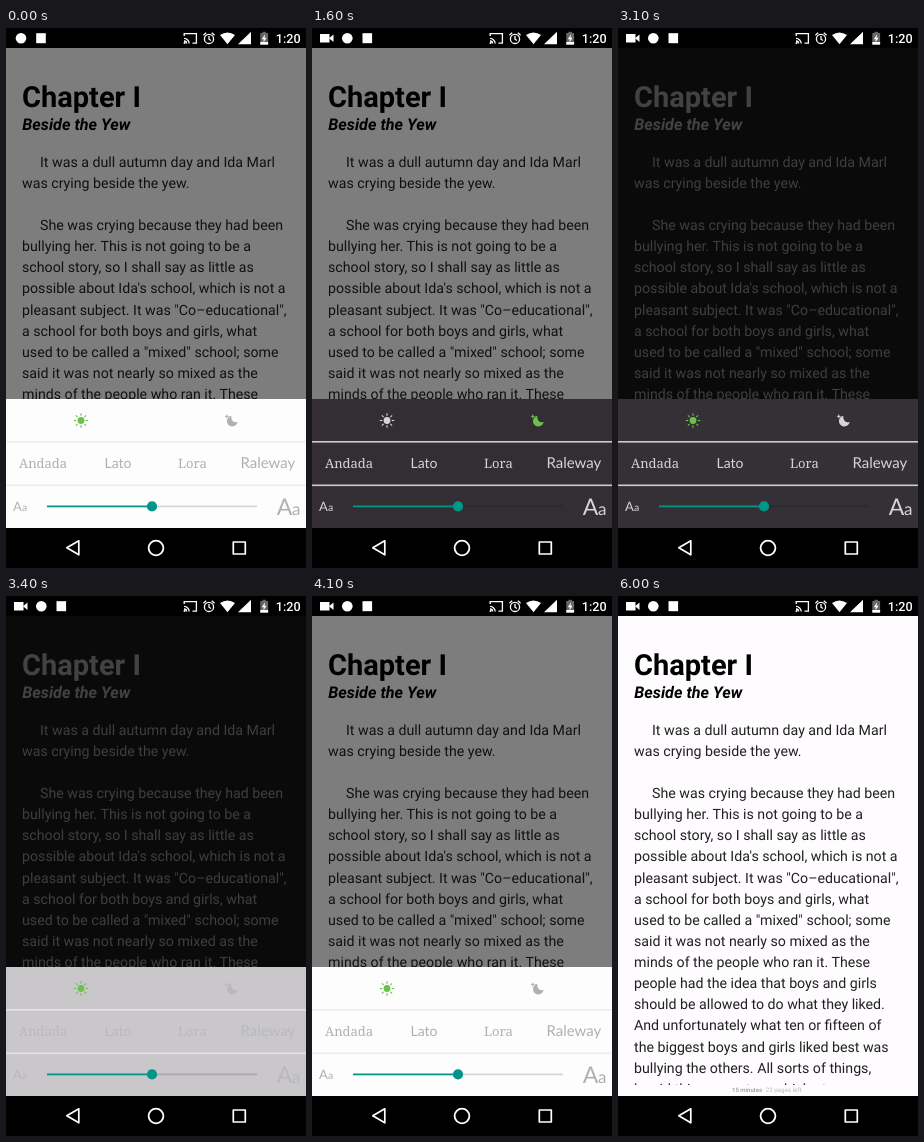
Animation of 300x540 px, one loop 7.1 s. Source, as an HTML page with a canvas:

```html
<!DOCTYPE html>
<html lang="en">
<head>
<meta charset="utf-8">
<title>Reader settings</title>
<style>
html, body { margin: 0; width: 100%; height: 100%; overflow: hidden; background: #000; }
canvas { display: block; width: 300px; height: 540px; }
</style>
</head>
<body>
<canvas id="stage"></canvas>
<script>
const W = 300, H = 540, LOOP = 7100, STEP = 100;
const TEAL = '#009688', GREEN = '#6cc04c';
const SHEET_TOP = 371, SHEET_H = 129;

const canvas = document.getElementById('stage');
const ctx = canvas.getContext('2d');
const dpr = window.devicePixelRatio || 1;
canvas.width = W * dpr;
canvas.height = H * dpr;

const LINES = [
  '>It was a dull autumn day and Ida Marl',
  'was crying beside the yew.',
  '',
  '>She was crying because they had been',
  'bullying her. This is not going to be a',
  'school story, so I shall say as little as',
  'possible about Ida\'s school, which is not a',
  'pleasant subject. It was "Co\u2013educational",',
  'a school for both boys and girls, what',
  'used to be called a "mixed" school; some',
  'said it was not nearly so mixed as the',
  'minds of the people who ran it. These',
  'people had the idea that boys and girls',
  'should be allowed to do what they liked.',
  'And unfortunately what ten or fifteen of',
  'the biggest boys and girls liked best was',
  'bullying the others. All sorts of things,',
  'horrid things, went on which at an'
];

const clamp = v => Math.max(0, Math.min(1, v));
const smooth = v => (1 - Math.cos(Math.PI * clamp(v))) / 2;
const mix = (a, b, p) =>
  'rgb(' + a.map((v, i) => Math.round(v + (b[i] - v) * p)).join(',') + ')';

function text(str, x, y, font, color) {
  ctx.font = font;
  ctx.fillStyle = color;
  ctx.fillText(str, x, y);
}

function rect(x, y, w, h, color) {
  ctx.fillStyle = color;
  ctx.fillRect(x, y, w, h);
}

function disc(x, y, r, color) {
  ctx.fillStyle = color;
  ctx.beginPath();
  ctx.arc(x, y, r, 0, Math.PI * 2);
  ctx.fill();
}

function ring(x, y, r, width) {
  ctx.lineWidth = width;
  ctx.beginPath();
  ctx.arc(x, y, r, 0, Math.PI * 2);
  ctx.stroke();
}

function path(points, close) {
  ctx.beginPath();
  points.forEach(([x, y]) => ctx.lineTo(x, y));
  if (close) ctx.closePath();
}

function drawPage(dark) {
  const ink = dark ? '#7c7c7c' : '#212121';
  const head = dark ? '#858585' : '#000';
  const paper = dark ? '#151515' : '#fefcfe';
  rect(0, 20, W, 480, paper);
  text('Chapter I', 16, 79, 'bold 29px Roboto, sans-serif', head);
  text('Beside the Yew', 16.3, 101.5, 'italic bold 16.2px Roboto, sans-serif', head);
  LINES.forEach((line, i) => {
    const indent = line[0] === '>';
    text(indent ? line.slice(1) : line, indent ? 34 : 16, Math.round(138.7 + 21.12 * i),
      '14.2px Roboto, sans-serif', ink);
  });
  rect(0, 489, W, 11, paper);
  text('15 minutes', 114, 495.5, '500 6px Roboto, sans-serif', '#999');
  text('\u00b7 23 pages left', 144.5, 495.5, '6.2px Roboto, sans-serif', '#bbb');
}

function drawSun(x, y, color) {
  disc(x, y, 3.4, color);
  ctx.strokeStyle = color;
  ctx.lineWidth = 1.1;
  for (let i = 0; i < 8; i++) {
    const c = Math.cos(i * Math.PI / 4), s = Math.sin(i * Math.PI / 4);
    path([[x + c * 4.8, y + s * 4.8], [x + c * 7.2, y + s * 7.2]]);
    ctx.stroke();
  }
}

function drawMoon(x, y, color) {
  ctx.fillStyle = color;
  ctx.beginPath();
  ctx.arc(x, y, 5.4, -1.75, 0.15, true);
  ctx.quadraticCurveTo(x + 1.8, y + 2.4, x - 0.2, y - 0.8);
  ctx.quadraticCurveTo(x - 1.4, y - 3, x - 1, y - 5.3);
  ctx.fill();
  const sx = x - 5.5, sy = y - 4.6;
  path([[sx, sy - 2.4], [sx + 0.7, sy - 0.7], [sx + 2.4, sy], [sx + 0.7, sy + 0.7],
    [sx, sy + 2.4], [sx - 0.7, sy + 0.7], [sx - 2.4, sy], [sx - 0.7, sy - 0.7]], true);
  ctx.fill();
}

// night: 0 for the light theme, 1 for the dark one
function drawSheet(offset, night, moonOn) {
  const ink = mix([176, 176, 176], [214, 212, 214], night);
  const rule = mix([238, 238, 238], [205, 203, 205], night);
  ctx.save();
  ctx.beginPath();
  ctx.rect(0, 20, W, 480);
  ctx.clip();
  ctx.translate(0, offset);
  rect(0, SHEET_TOP, W, SHEET_H, mix([254, 253, 254], [50, 46, 52], night));
  rect(0, 413, W, 1.6, rule);
  rect(0, 456.5, W, 1.6, rule);

  drawSun(75, 392.5, moonOn ? ink : GREEN);
  drawMoon(226.3, 393, moonOn ? GREEN : ink);

  text('Andada', 13, 440, '13px "Noto Serif", serif', ink);
  text('Lato', 98.5, 440, '14px Lato, sans-serif', ink);
  text('Lora', 172, 440, '13px "Noto Serif", serif', ink);
  text('Raleway', 234.5, 440, '15px Lato, sans-serif', ink);

  text('A', 7, 483, '13px Lato, sans-serif', ink);
  text('a', 16, 483, '10.5px Lato, sans-serif', ink);
  text('A', 270.7, 487, '23px Lato, sans-serif', ink);
  text('a', 286, 487, '17px Lato, sans-serif', ink);

  rect(146, 477.5, 105, 1.8, 'rgba(0,0,0,.15)');
  rect(41, 477.5, 105, 1.8, TEAL);
  disc(146, 478.4, 5.1, TEAL);
  ctx.restore();
}

function drawStatus(recording) {
  rect(0, 0, W, 20, '#000');
  const shift = recording ? 20.3 : 0;
  if (recording) {
    rect(8, 6, 9.5, 8.5, '#fff');
    ctx.fillStyle = '#fff';
    path([[17, 10.2], [21.5, 6.5], [21.5, 14]], true);
    ctx.fill();
  }
  disc(15 + shift, 10.3, 5.3, '#fff');
  rect(30.2 + shift, 5.2, 9.6, 10, '#fff');

  // cast
  ctx.strokeStyle = '#fff';
  ctx.lineWidth = 1.3;
  path([[178.2, 8], [178.2, 5.6], [190.4, 5.6], [190.4, 15.2], [186.5, 15.2]]);
  ctx.stroke();
  for (const r of [2.6, 5.2]) {
    ctx.beginPath();
    ctx.arc(178, 15.6, r, -Math.PI / 2, 0);
    ctx.stroke();
  }
  disc(178.5, 15, 1, '#fff');

  // alarm
  ring(203, 10.9, 4.6, 1.3);
  path([[203, 8], [203, 11.2], [205, 12.5]]);
  ctx.stroke();
  path([[197.4, 7.2], [200.2, 4.8]]);
  ctx.stroke();
  path([[208.6, 7.2], [205.8, 4.8]]);
  ctx.stroke();

  // wifi and signal
  ctx.fillStyle = '#fff';
  ctx.beginPath();
  ctx.moveTo(221.5, 16.3);
  ctx.lineTo(214, 7);
  ctx.quadraticCurveTo(221.5, 2, 229, 7);
  ctx.fill();
  path([[232, 16.3], [245, 16.3], [245, 3.8]], true);
  ctx.fill();

  // battery
  rect(256.4, 3.8, 3.6, 1.6, '#666');
  rect(254.3, 5, 7.8, 11.6, '#666');
  rect(254.3, 14, 7.8, 2.6, '#fff');
  ctx.fillStyle = '#fff';
  path([[259, 6.3], [255.8, 11.2], [257.8, 11.2], [257.4, 14.5], [260.6, 9.8], [258.6, 9.8]], true);
  ctx.fill();

  text('1:20', 269.8, 15, '500 12.6px Roboto, sans-serif', '#fff');
}

function drawNav() {
  rect(0, 500, W, 40, '#000');
  ctx.strokeStyle = '#fff';
  ctx.lineWidth = 1.7;
  ctx.lineJoin = 'round';
  path([[60.8, 519.8], [72.8, 512.8], [72.8, 526.8]], true);
  ctx.stroke();
  ring(150, 520, 7.4, 1.8);
  ctx.lineWidth = 1.7;
  ctx.strokeRect(227.3, 514, 12, 12);
  ctx.lineJoin = 'miter';
}

function draw(t) {
  const moonOn = t >= 700 && t < 3100;
  const night = smooth((t - 730) / 500) - smooth((t - 3070) / 500);
  const slide = clamp((t - 5500) / 150);
  const dim = 0.5 * clamp((6000 - t) / 480);

  ctx.setTransform(dpr, 0, 0, dpr, 0, 0);
  ctx.textRendering = 'geometricPrecision';
  drawPage(t >= 2000 && t < 4000);
  rect(0, 20, W, 480, `rgba(0,0,0,${dim})`);
  if (slide < 1) drawSheet(SHEET_H * slide * slide, night, moonOn);
  drawStatus(t >= 100);
  drawNav();
}

const start = performance.now();
function tick() {
  const t = (performance.now() - start) % LOOP;
  draw(Math.floor(t / STEP) * STEP);
  requestAnimationFrame(tick);
}
tick();
</script>
</body>
</html>
```
